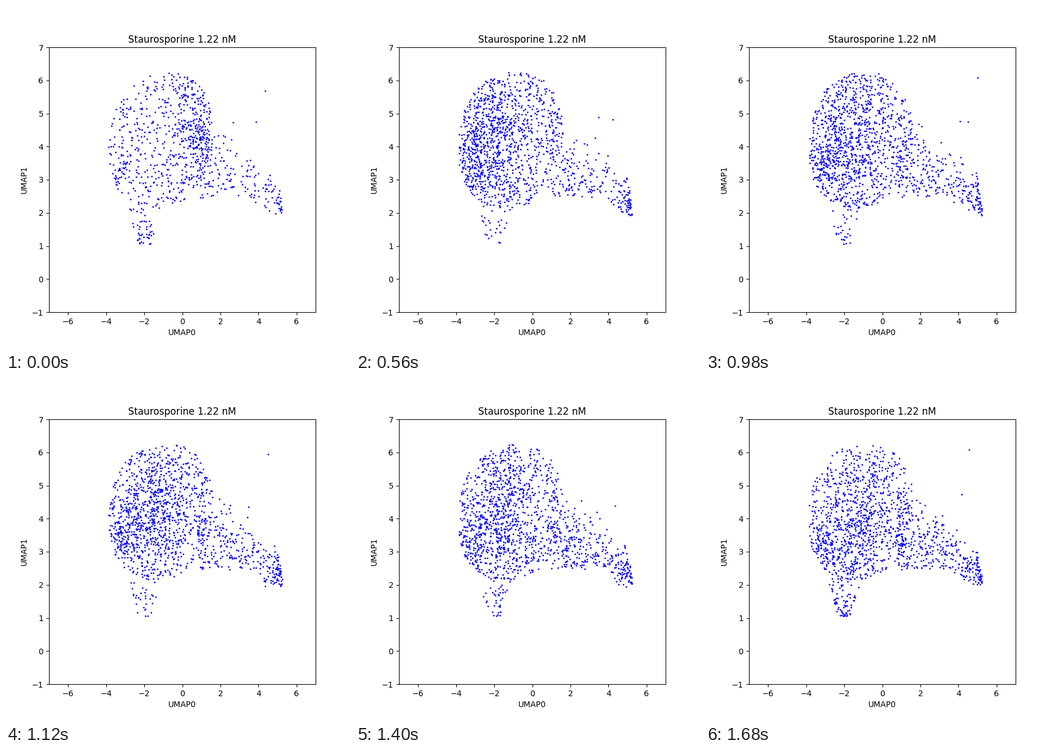
Animation of 600 by 600 pixels, one loop 1820 ms. Source, as a matplotlib script:

```python
import numpy as np
import matplotlib.pyplot as plt
from matplotlib.animation import FuncAnimation

FRAMES, INTERVAL = 13, 140


def in_body(x, y):
    """Leaning egg that holds the main population."""
    dx = (x + 1.15 - 0.12 * (y - 4.2)) / 2.72
    dy = (y - 4.2) / 2.05
    return np.abs(dx) ** 2.3 + np.abs(dy) ** 2.3 < 1


def body(n, draw):
    """Keep the first n drawn points that fall inside the egg."""
    x, y = draw(4 * int(n) + 50)
    keep = np.flatnonzero(in_body(x, y))[:int(n)]
    return x[keep], y[keep]


def bridge(rng, n):
    x = 0.8 + 3.85 * rng.beta(1, 1.5, n)
    low = 2.45 - 0.2 * np.clip(x - 3, 0, None) ** 2
    high = 5.3 - 0.47 * (x - 0.8)
    return x, low + (high - low) * rng.beta(1.3, 2, n)


def tip(rng, n):
    y = 1.87 + 1.4 * rng.beta(1.8, 2.6, n)
    edge = 5.24 - 0.3 * np.clip(y - 2.2, 0, None)
    return edge - rng.exponential(np.clip(0.55 * (y - 1.6), 0, 0.42)), y


def tail(rng, n):
    y = 1.05 + 1.3 * rng.beta(1, 1.3, n)
    return -2 + rng.uniform(-1, 1, n) * (0.35 + 0.45 * (y - 1.05)), y


def strays(rng):
    x, y = rng.uniform((2.4, 4), (4.9, 4.9), (3, 2)).T
    if rng.random() < 0.7:
        x[0], y[0] = rng.uniform((4.2, 5.6), (5.2, 6.1))
    return x, y


def cloud(step):
    rng = np.random.default_rng(100 + step)
    t = step / (FRAMES - 1)
    start = np.exp(-step)  # the sparse opening fades quickly

    # The dense spot jumps left, then drifts slowly back
    spot = -2.2 + t ** 2 + 3 * start, 4.4 - 0.6 * t ** 2
    size = 1180 - 530 * start - 130 * t ** 2

    def blob(center, spread):
        return lambda n: rng.normal(center, spread, (n, 2)).T

    def even(n):
        return rng.uniform((-4, 2.1), (1.9, 6.3), (n, 2)).T

    return np.hstack([
        body(0.58 * size, even),
        body(0.35 * size, blob(spot, (0.95, 1.1))),
        body(0.07 * size, blob((-3.2, 3.4), (0.35, 0.5))),
        bridge(rng, int(100 + 170 * t + 30 * start)),
        tip(rng, int(75 + 12 * t - 35 * start)),
        tail(rng, int(28 + 50 * t ** 6 + 20 * start)),
        strays(rng),
    ])


fig, ax = plt.subplots(figsize=(6, 6), dpi=100)
ax.set(xlim=(-7, 7), ylim=(-1, 7), xlabel="UMAP0", ylabel="UMAP1",
       title="Staurosporine 1.22 nM")
dots, = ax.plot([], [], "b.", markersize=2)


def update(step):
    dots.set_data(*cloud(step))
    return dots,


anim = FuncAnimation(fig, update, frames=FRAMES, interval=INTERVAL,
                     init_func=lambda: update(0), repeat=True, repeat_delay=0)
plt.show()
```
